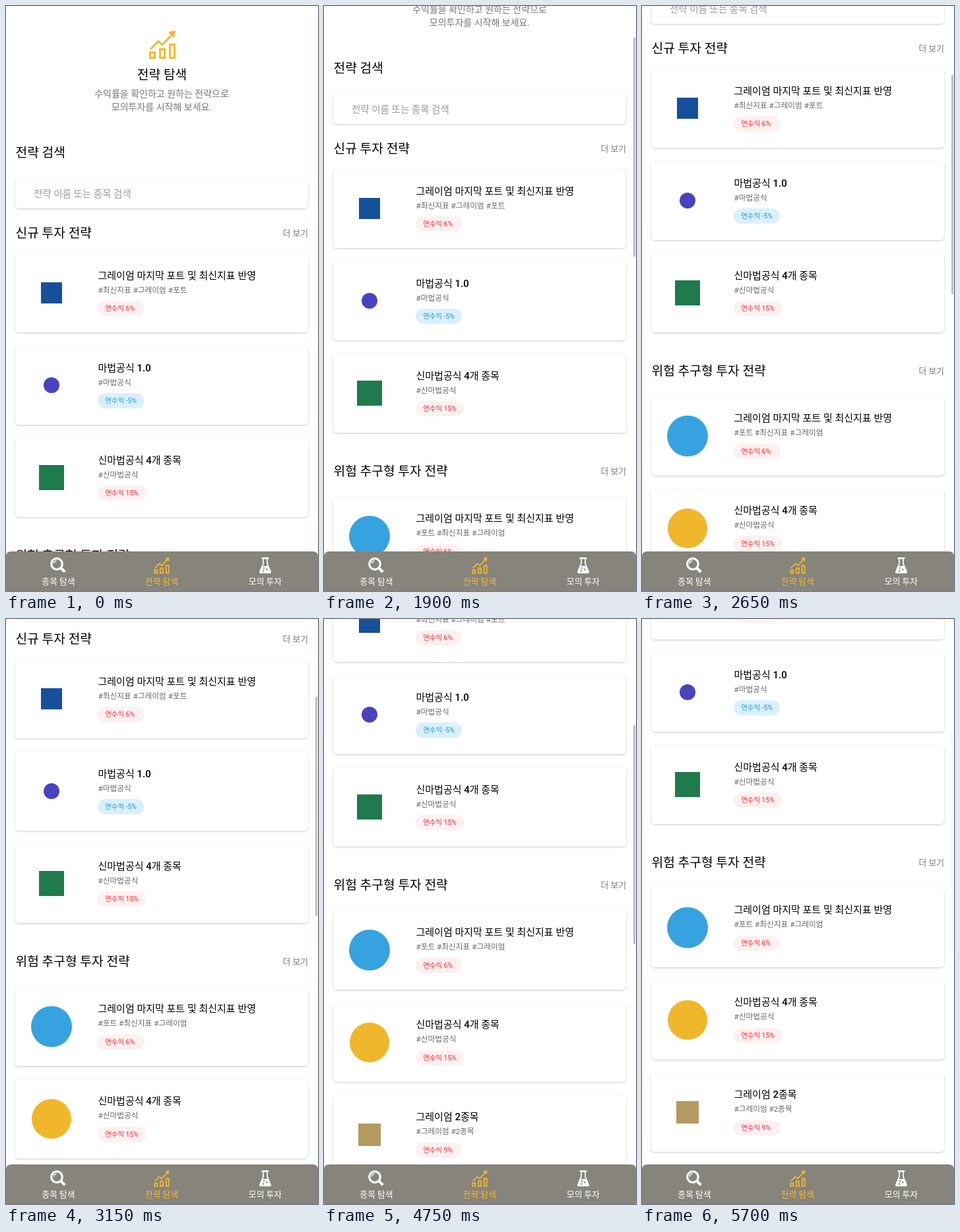
An HTML page that plays this animation: 473x887 px, repeating every 5.8 s.

```html
<!DOCTYPE html>
<html lang="ko">
<head>
<meta charset="utf-8">
<title>전략 탐색</title>
<style>
html, body { margin: 0; width: 100%; height: 100%; overflow: hidden; background: #fff; }
svg { display: block; width: 473px; height: 887px; }
text { font-family: Roboto, "Noto Sans CJK KR", "Noto Sans CJK", sans-serif; white-space: pre; }
.head { font-size: 19.2px; font-weight: 500; }
.name { font-size: 15px; font-weight: 500; }
.sub { font-size: 14px; fill: #777; }
.hint { font-size: 14.5px; fill: #9a9a9a; }
.more { font-size: 12.8px; fill: #777; text-anchor: end; }
.tags { font-size: 11.7px; fill: #666; }
.rate { font-size: 10.4px; }
.tab { font-size: 12.8px; }
.mid { text-anchor: middle; }
</style>
</head>
<body>
<svg viewBox="0 0 473 887">
  <defs>
    <filter id="shade" x="-5%" y="-20%" width="110%" height="140%">
      <feDropShadow dx="0" dy="1" stdDeviation="1.4" flood-color="#000" flood-opacity=".21"/>
    </filter>
    <g id="chart">
      <path d="M1.5 33.5h7v8h-7zM16.5 28.5h7v13h-7zM31.5 21.5h7v20h-7z" fill="none" stroke="currentColor" stroke-width="3"/>
      <path d="M2 28.5L14 16.5L20 22L35 6" fill="none" stroke="currentColor" stroke-width="3"/>
      <path d="M29 2.2L40 0L38 11.2z" fill="currentColor"/>
    </g>
  </defs>
  <g id="page"></g>
  <rect id="thumb" x="469" width="3" height="332" fill="#bfbfbf"/>
  <g id="nav">
    <path d="M0 887V835Q0 827 8 827H465Q473 827 473 835V887z" fill="#87847c"/>
    <g fill="none" stroke="#fff">
      <circle cx="77" cy="846" r="8.3" stroke-width="3.2"/>
      <path d="M83.5 852.5L89.3 858.3" stroke-width="4.2"/>
      <path d="M72.4 845.5A4.8 4.8 0 0 1 76.5 841.3" stroke-width="1.4"/>
    </g>
    <use href="#chart" transform="translate(224.5 836) scale(.575)" color="#f3b92f"/>
    <g fill="#fff">
      <rect x="387.5" y="836" width="11" height="2.4" rx="1"/>
      <path d="M390 838V845.5L385 857.5Q384.5 859.3 386 859.3H400Q401.5 859.3 401 857.5L396 845.5V838" fill="none" stroke="#fff" stroke-width="1.7"/>
      <path d="M388.7 849H397.3L401 859H385z"/>
    </g>
    <g fill="#87847c">
      <circle cx="391" cy="852.3" r="1.2"/>
      <circle cx="395.2" cy="854.3" r="1.3"/>
      <circle cx="390" cy="856.5" r="1.2"/>
    </g>
  </g>
</svg>
<script>
const NS = 'http://www.w3.org/2000/svg';
const page = document.getElementById('page');
const thumb = document.getElementById('thumb');
const nav = document.getElementById('nav');

function add(parent, tag, attrs, str) {
  const el = document.createElementNS(NS, tag);
  for (const k in attrs) el.setAttribute(k, attrs[k]);
  if (str) el.textContent = str;
  return parent.appendChild(el);
}
const label = (x, y, cls, str, fill, parent = page) =>
  add(parent, 'text', fill ? { x, y, class: cls, fill } : { x, y, class: cls }, str);
const panel = (y, height) =>
  add(page, 'rect', { x: 14, y, width: 444, height, rx: 6, fill: '#fff', filter: 'url(#shade)' });

function mark(shape, cx, cy, size, fill) {
  if (shape === 'circle') add(page, 'circle', { cx, cy, r: size / 2, fill });
  else add(page, 'rect', { x: cx - size / 2, y: cy - size / 2, width: size, height: size, fill });
}

function card(y, dy, name, tags, rate, shape, size, color) {
  const loss = rate < 0;
  panel(y, 120);
  mark(shape, 69, y + 60, size, color);
  label(139.5, y + 39 + dy, 'name', name);
  label(139.5, y + 60 + dy, 'tags', tags);
  add(page, 'rect', { x: 139, y: y + 72, width: rate > 9 ? 73 : 70, height: 23, rx: 11.5, fill: loss ? '#daf0ff' : '#fff0f1' });
  label(150.3, y + 87, 'rate', `연수익 ${rate}%`, loss ? '#1a94ee' : '#fb2530');
}

function section(y, title) {
  label(14.5, y, 'head', title);
  label(458, y - 2.5, 'more', '더 보기');
}

add(page, 'use', { href: '#chart', x: 217, y: 37, color: '#f3b92f' });
label(236.5, 111, 'head mid', '전략 탐색');
label(236, 138, 'sub mid', '수익률을 확인하고 원하는 전략으로');
label(236, 158, 'sub mid', '모의투자를 시작해 보세요.');
label(14.5, 229, 'head', '전략 검색');
panel(261, 46);
label(42, 290, 'hint', '전략 이름 또는 종목 검색');

section(351, '신규 투자 전략');
card(375, 0, '그레이엄 마지막 포트 및 최신지표 반영', '#최신지표 #그레이엄 #포트', 6, 'square', 32, '#17509a');
card(515, 0, '마법공식 1.0', '#마법공식', -5, 'circle', 24, '#4a43c0');
card(655, 0, '신마법공식 4개 종목', '#신마법공식', 15, 'square', 38, '#1f7a4d');

section(840, '위험 추구형 투자 전략');
card(872, -1, '그레이엄 마지막 포트 및 최신지표 반영', '#포트 #최신지표 #그레이엄', 6, 'circle', 62, '#36a3e0');
card(1012, -1, '신마법공식 4개 종목', '#신마법공식', 15, 'circle', 60, '#f0b62c');
card(1152, -1, '그레이엄 2종목', '#그레이엄 #2종목', 9, 'square', 34, '#b39a5e');

label(79.5, 876.5, 'tab mid', '종목 탐색', '#fff', nav);
label(236, 876.5, 'tab mid', '전략 탐색', '#f3b92f', nav);
label(393, 876.5, 'tab mid', '모의 투자', '#fff', nav);

// Scroll offset over time: [ms, px], joined by a monotone cubic.
const KEYS = [[0, 0], [1450, 0], [1500, 1], [2250, 249], [2650, 280], [3150, 314], [4300, 314],
  [4350, 315], [4750, 430], [4900, 433], [4950, 433], [5150, 464], [5800, 464]];
const grade = i => (KEYS[i + 1][1] - KEYS[i][1]) / (KEYS[i + 1][0] - KEYS[i][0]);
const slopes = KEYS.map((_, i) => {
  if (!i || i === KEYS.length - 1) return 0;
  const a = grade(i - 1), b = grade(i);
  return a * b > 0 ? 2 * a * b / (a + b) : 0;
});

function scrollAt(t) {
  let i = 0;
  while (i < KEYS.length - 2 && t >= KEYS[i + 1][0]) i++;
  const [t0, y0] = KEYS[i], [t1, y1] = KEYS[i + 1];
  const h = t1 - t0, u = (t - t0) / h, v = 1 - u;
  return Math.round(y0 * (1 + 2 * u) * v * v + slopes[i] * h * u * v * v
    + y1 * u * u * (3 - 2 * u) - slopes[i + 1] * h * u * u * v);
}

const fade = (t, start) => Math.max(0, Math.min(1, 1 - (t - start) / 250));

function thumbAlpha(t) {
  if (t < 1500) return 0;
  return t < 4350 ? fade(t, 3450) : fade(t, 5480);
}

const LOOP = 5800, TICK = 50;

function draw(now) {
  const t = Math.floor((now % LOOP) / TICK) * TICK;
  const y = scrollAt(t);
  page.setAttribute('transform', `translate(0 ${-y})`);
  thumb.setAttribute('y', Math.round(y * 0.374 + 0.6));
  thumb.setAttribute('opacity', thumbAlpha(t));
}

const begin = performance.now();
function frame() {
  draw(performance.now() - begin);
  requestAnimationFrame(frame);
}
frame();
</script>
</body>
</html>
```
